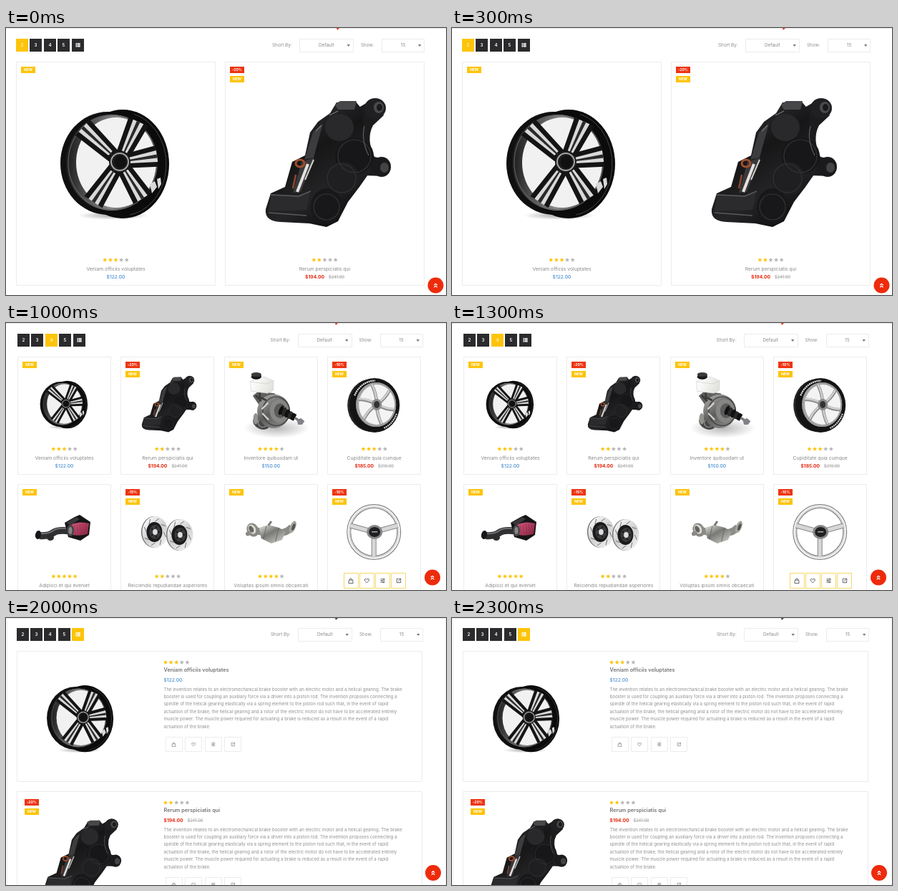
These frames come from a looping animation (615x373 px, 2500 ms). An HTML page with a canvas:

```html
<!DOCTYPE html>
<html lang="en">
<head>
<meta charset="utf-8">
<title>Product grid layouts</title>
<style>
html, body { margin: 0; width: 615px; height: 373px; overflow: hidden; background: #fff; }
canvas { display: block; }
</style>
</head>
<body>
<canvas id="stage" width="615" height="373"></canvas>
<script>
const ctx = document.getElementById('stage').getContext('2d');
const TAU = Math.PI * 2;
const YELLOW = '#fdc40a', RED = '#ee3412', DARK = '#2b2b2d', BLUE = '#4a8fd0', LINE = '#ececec';

function rect(x, y, w, h, fill) {
  ctx.fillStyle = fill;
  ctx.fillRect(x, y, w, h);
}
function frame(x, y, w, h, color = LINE) {
  const left = Math.round(x), top = Math.round(y);
  rect(left, top, w, h, '#fff');
  ctx.strokeStyle = color;
  ctx.lineWidth = 1;
  ctx.strokeRect(left + 0.5, top + 0.5, Math.round(w) - 1, Math.round(h) - 1);
}
function oval(x, y, rx, ry, fill, turn = 0) {
  ctx.beginPath();
  ctx.ellipse(x, y, rx, ry, turn, 0, TAU);
  ctx.fillStyle = fill;
  ctx.fill();
}
function ring(x, y, rx, ry, color, width, from = 0, to = TAU) {
  ctx.beginPath();
  ctx.ellipse(x, y, rx, ry, 0, from, to);
  ctx.strokeStyle = color;
  ctx.lineWidth = width;
  ctx.stroke();
}
function shape(d, fill) {
  ctx.fillStyle = fill;
  ctx.fill(new Path2D(d));
}
function stroke(d, color, width, cap = 'butt') {
  ctx.strokeStyle = color;
  ctx.lineWidth = width;
  ctx.lineCap = cap;
  ctx.lineJoin = 'round';
  ctx.stroke(new Path2D(d));
  ctx.lineCap = 'butt';
}
function shade(x0, y0, x1, y1, ...colors) {
  const g = ctx.createLinearGradient(x0, y0, x1, y1);
  colors.forEach((c, i) => g.addColorStop(i / (colors.length - 1), c));
  return g;
}
function shadow(x, y, rx, ry, strength) {
  ctx.save();
  ctx.translate(x, y);
  ctx.scale(rx, ry);
  const g = ctx.createRadialGradient(0, 0, 0, 0, 0, 1);
  g.addColorStop(0, `rgba(0,0,0,${strength})`);
  g.addColorStop(1, 'rgba(0,0,0,0)');
  oval(0, 0, 1, 1, g);
  ctx.restore();
}
function font(size, weight = 400) {
  ctx.font = `${weight} ${size}px Inter, "Open Sans", sans-serif`;
}
function text(str, x, y, size, color, align = 'left', weight = 400) {
  font(size, weight);
  ctx.textAlign = align;
  ctx.textBaseline = 'middle';
  ctx.fillStyle = color;
  ctx.fillText(str, x, y);
}
function widthOf(str, size, weight) {
  font(size, weight);
  return ctx.measureText(str).width;
}

// Each picture is drawn in its own box: left, top and side length.
const pictures = {
  wheel: [22, 55, 263, () => {
    shadow(150, 262, 50, 6, 0.35);
    oval(142, 189, 66, 72, '#101011');
    oval(163, 190, 65, 76, '#0b0b0c');
    oval(148, 188, 64, 67, shade(85, 180, 215, 190, '#1d1d1e', '#8a8a8c', '#3a3a3c'));
    oval(154, 188, 56, 63, '#f1f1f1');
    ring(149, 188, 62, 66, '#5d5d60', 1.2);
    [[107, 139], [185, 131], [211, 179], [191, 238], [122, 243]].forEach(([x, y]) => {
      const dx = x - 159, dy = y - 187, len = Math.hypot(dx, dy);
      const nx = -dy / len, ny = dx / len;
      const spoke = (start, near, far, color) => {
        const sx = 159 + dx * start, sy = 187 + dy * start;
        shape(`M${sx + nx * near} ${sy + ny * near}L${x + nx * far} ${y + ny * far}` +
          `L${x - nx * far} ${y - ny * far}L${sx - nx * near} ${sy - ny * near}Z`, color);
      };
      spoke(0, 9, 15, '#141415');
      spoke(0.25, 4, 8, '#d9d9da');
      spoke(0.2, 1, 2.5, '#2a2a2b');
    });
    oval(159, 187, 15, 15, '#1c1c1d');
    ring(159, 187, 12, 12, '#a5a5a7', 2);
    oval(160, 187, 8, 9, '#111');
    shape('M201 218l7-4 3 8-7 9zM211 211l5-2 1 9-4 7z', '#d8d8d8');
    ring(163, 190, 61, 72, '#444446', 1, -1.3, 1.4);
  }],
  caliper: [314, 55, 263, () => {
    shape('M488 114L512 100 528 122 513 136Q503 155 515 180L532 184 530 207 502 206 474 160Z', '#1c1c1e');
    oval(516, 112, 15, 14, '#202022');
    oval(521, 111, 7, 8, '#4a4a4d');
    oval(522, 111, 4, 5, '#1a1a1a');
    oval(525, 194, 13, 14, '#1a1a1c');
    oval(529, 195, 6, 7, '#434346');
    shape('M425 146L436 131 453 119 462 104 488 102 499 115 500 150 512 178 508 202 494 222 478 243 464 270 448 278 424 273 384 271Q361 270 363 253L370 231 390 222 400 187 418 178Z',
      shade(390, 130, 480, 270, '#2e2e31', '#161617', '#242426', '#0d0d0e'));
    shape('M460 107L467 102H490L487 114H464Z', '#47474a');
    oval(466, 139, 20, 19, '#29292c');
    shape('M429 146L443 133 430 181 417 184Z', '#3c3c3f');
    stroke('M433 144L441 136M452 122L464 116', '#77777a', 1.2);
    shape('M413 187L431 181 412 229 401 230Z', '#39393b');
    stroke('M422 190L407 229', '#e4e2df', 4);
    stroke('M430 184L418 212', '#cfcdc9', 2);
    ring(411, 189, 6, 5, '#a14f2c', 3);
    stroke('M405 205L401 224', '#8e482c', 2.5);
    oval(487, 179, 27, 26, '#171719');
    oval(470, 210, 24, 23, '#1f1f21');
    oval(448, 249, 22, 25, '#18181a');
    [[487, 179, 23], [469, 210, 20], [448, 250, 18]].forEach(([x, y, r]) => ring(x, y, r, r, '#333336', 1.2));
    shape('M370 232L409 234 425 229 420 254 367 256Z', '#2b2b2e');
    stroke('M370 233L409 235 426 228M367 258L420 262', '#59595c', 1.5);
    stroke('M501 137Q496 157 507 178', '#5d5d60', 1.2);
  }],
  booster: [411, 54, 165, () => {
    shadow(505, 186, 66, 20, 0.28);
    shape('M457 121L468 112 501 116 513 137 477 150Z', '#5f5f5e');
    oval(475, 174, 18, 14, '#474748', 0.4);
    oval(463, 167, 5, 11, '#93938f');
    ring(477, 175, 9, 9, '#8b8b89', 2);
    oval(499, 152, 33, 34, shade(475, 120, 520, 185, '#aaa9a6', '#5d5d5d', '#8d8c89'));
    ring(504, 152, 27, 29, '#444', 2);
    oval(510, 151, 19, 23, '#868684');
    oval(512, 151, 12, 15, '#5b5b5a');
    shape('M452 92L480 83 499 91 498 110 487 116 454 112Z', shade(455, 90, 500, 110, '#fff', '#deded9'));
    stroke('M452 92L480 83 499 91 498 110 487 116 454 112ZM452 93L485 97 498 91', '#c6c6c2', 0.8);
    oval(464, 83, 10, 5, '#111');
    shape('M455 78H474V84H455Z', '#242424');
    oval(464, 78, 10, 4, '#3b3b3b');
    stroke('M471 115V124L484 130M463 120L474 132', '#3b3b3b', 4);
    stroke('M511 149L542 165', '#171717', 14);
    for (let i = 0; i < 5; i++) oval(514 + i * 6, 150 + i * 3.2, 4, 10 - i * 0.7, i % 2 ? '#292929' : '#111', 0.4);
    stroke('M541 165L554 173', '#777', 5);
    shape('M545 169L554 166 561 172 556 179 548 179Z', '#808288');
    stroke('M475 148L488 135M476 156L489 169', '#d6d4cf', 3);
  }],
  tyre: [457, 55, 115, () => {
    oval(511, 115, 34, 37, '#252525');
    oval(515, 115, 35, 38, '#141414');
    oval(517, 114, 28, 31, '#a9a9a9');
    oval(518, 114, 25, 28, '#f3f3f3');
    for (let i = 0; i < 6; i++) {
      const a = i * TAU / 6 + 0.25;
      const x = 518 + 26 * Math.cos(a), y = 114 + 29 * Math.sin(a);
      const mx = 518 + 14 * Math.cos(a + 0.25), my = 114 + 15 * Math.sin(a + 0.25);
      stroke(`M518 114Q${mx} ${my} ${x} ${y}`, '#8c8c8c', 4.5);
      stroke(`M518 113Q${mx} ${my - 1} ${x} ${y - 1}`, '#d0d0d0', 2.5);
    }
    ring(517, 114, 27, 30, '#9c9c9c', 2);
    oval(518, 114, 7, 8, '#8a8a8a');
    oval(518, 114, 4, 5, '#333');
    ctx.setLineDash([2, 0.8]);
    ring(516, 115, 31.5, 34.5, '#e7e7e7', 2.3, 3.55, 4.7);
    ring(516, 115, 31.5, 34.5, '#ccc', 2.3, 0.35, 1.2);
    ctx.setLineDash([]);
  }],
  intake: [24, 233, 115, () => {
    stroke('M47 297Q59 298 66 293T91 291', '#303033', 10);
    stroke('M48 294Q59 295 66 290T90 288', '#737377', 2);
    oval(45, 296, 4, 6, '#17171a', 0.2);
    oval(62, 300, 5, 4, '#2c2c2e');
    shape('M82 279L96 271 103 268 118 278 116 296 104 304 87 299Z', '#151517');
    shape('M84 279L98 271 103 274 90 283Z', '#38383b');
    shape('M91 282Q102 276 116 280L114 295Q103 298 93 296Z', shade(94, 279, 112, 298, '#cf5478', '#872643'));
    for (let i = 0; i < 5; i++) stroke(`M${95 + i * 4} ${282 - i * 0.4}L${97 + i * 3.8} ${296 - i * 0.4}`, '#8d2c4b', 0.6);
    oval(90, 290, 5, 8, '#444447');
    oval(90, 290, 2.5, 5, '#87878a');
  }],
  discs: [169, 233, 115, () => {
    [[209, 292], [244, 296]].forEach(([x, y]) => {
      oval(x - 1.5, y, 18, 22, '#777');
      oval(x, y, 18, 22, shade(x - 15, y - 18, x + 15, y + 18, '#fafafa', '#cfcfcf', '#f0f0f0'));
      for (let i = 0; i < 8; i++) {
        const a = i * TAU / 8;
        stroke(`M${x + 12 * Math.cos(a)} ${y + 15 * Math.sin(a)}L${x + 16 * Math.cos(a + 0.35)} ${y + 20 * Math.sin(a + 0.35)}`, '#646464', 0.9);
      }
      oval(x - 1, y, 11, 14, '#1a1a1c');
      oval(x, y, 8, 10, '#3a3a3c');
      for (let i = 0; i < 5; i++) oval(x + 5.3 * Math.cos(i * TAU / 5), y + 7 * Math.sin(i * TAU / 5), 1, 1.2, '#111');
      oval(x, y, 3.3, 4, '#dedede');
    });
  }],
  converter: [313, 233, 115, () => {
    stroke('M345 289L362 293M383 293Q393 293 400 285', '#8b8b88', 10);
    shape('M354 286L367 282 382 286 391 292 386 303 371 308 357 301Z', shade(360, 281, 375, 308, '#d8d8d4', '#797976', '#b7b7b3'));
    stroke('M364 284L360 302M381 287L377 305', '#696966', 1);
    oval(345, 289, 8, 10, '#8b8984', -0.5);
    oval(344, 288, 5, 7, '#dddcd6', -0.5);
    oval(343, 288, 3, 5, '#66645f', -0.5);
    oval(339, 294, 4, 3, '#8b8984', -0.5);
    oval(401, 285, 4, 9, '#a5a39e', 0.4);
    oval(402, 285, 2, 5, '#55534e', 0.4);
    stroke('M367 283L371 277', '#777', 3);
  }],
  steering: [457, 233, 115, () => {
    ring(514, 292, 35, 36, '#777', 6);
    ring(514, 292, 35, 36, '#dedede', 4);
    ring(514, 292, 36, 37, '#f8f8f8', 1.2);
    ring(514, 292, 33, 34, '#a5a5a5', 1);
    ['M514 292L481 283', 'M514 292L547 283', 'M514 292L514 326'].forEach(d => {
      stroke(d, '#888', 7);
      stroke(d, '#d7d7d7', 5);
    });
    oval(515, 292, 11, 10, '#888');
    oval(515, 292, 8, 7, '#202022');
    rect(511, 291, 8, 1.5, '#aaa');
  }],
  airbox: [371.5, 205, 88, () => {
    stroke('M392 264Q407 265 409 254L420 247', '#252529', 8);
    stroke('M394 261Q406 261 407 252', '#67676b', 1.5);
    shape('M389 237L400 232 414 238 414 250 397 249Z', '#2d2d31');
    oval(395, 238, 4, 5, '#65656a');
    shape('M413 238L437 234 441 253 419 259Z', '#38383c');
    shape('M415 239L435 236 438 250 420 255Z', shade(415, 236, 438, 255, '#98989c', '#555559'));
    shape('M407 248L419 259 440 254 438 263 418 269 403 262Z', '#19191c');
  }],
  seats: [488, 205, 88, () => {
    [[502, 224], [531, 222]].forEach(([x, y]) => {
      const leather = shade(x, y, x + 26, y + 52, '#b9683c', '#8b421f', '#b45f31');
      shape(`M${x + 9} ${y}h11l4 9 3 25-5 8h-15l-4-8 2-23z`, leather);
      shape(`M${x + 1} ${y + 37}q12-6 24 0l1 12-9 5h-17z`, leather);
      shape(`M${x + 9} ${y + 12}h10l2 20-6 5-7-4z`, '#a65b33');
      stroke(`M${x + 8} ${y + 12}l-2 22 7 5 9-5-2-22M${x + 2} ${y + 40}q11-4 22 0`, '#6b2f17', 0.8);
      rect(x + 11, y + 4, 7, 2, '#5b2914');
      stroke(`M${x} ${y + 53}h17l9-5`, '#37221b', 1.5);
    });
  }]
};

function picture(name, x, y, side) {
  const [left, top, size, draw] = pictures[name];
  ctx.save();
  ctx.translate(x, y);
  ctx.scale(side / size, side / size);
  ctx.translate(-left, -top);
  draw();
  ctx.restore();
}

const product = (pic, title, stars, price, old, off) => ({ pic, title, stars, price, old, off });
const products = [
  product('wheel', 'Veniam officiis voluptates', 3, '$122.00'),
  product('caliper', 'Rerum perspiciatis qui', 2, '$194.00', '$241.00', '-20%'),
  product('booster', 'Inventore quibusdam ut', 4, '$150.00'),
  product('tyre', 'Cupiditate quia cumque', 3, '$185.00', '$210.00', '-10%'),
  product('intake', 'Adipisci et qui eveniet', 5, '$130.00'),
  product('discs', 'Reiciendis repudiandae asperiores', 2, '$95.00', '$141.00', '-15%'),
  product('converter', 'Voluptas ipsum omnis obcaecati', 4, '$145.00'),
  product('steering', 'Assumenda nemo magni fugiat', 3, '$158.00', '$196.00', '-10%'),
  product('airbox', 'Veniam officiis voluptates', 3, '$122.00'),
  product('seats', 'Impedit accusantium quidem', 2, '$94.00', '$110.00', '-20%')
];

function starRow(x, y, count) {
  for (let i = 0; i < 5; i++) {
    ctx.beginPath();
    for (let k = 0; k < 10; k++) {
      const r = k % 2 ? 1.4 : 3.2, a = k * TAU / 10 - TAU / 4;
      ctx.lineTo(x + i * 7.6 + r * Math.cos(a), y + r * Math.sin(a));
    }
    ctx.fillStyle = i < count ? YELLOW : '#b5b5b8';
    ctx.fill();
  }
}

function badges(x, y, off) {
  const left = Math.round(x);
  (off ? [off, 'NEW'] : ['NEW']).forEach((label, i) => {
    const top = Math.round(y) + i * 13;
    rect(left, top, 20, 9, label === 'NEW' ? YELLOW : RED);
    text(label, left + 10, top + 4.8, 5, '#fff', 'center', 700);
  });
}

function priceWidth(p) {
  return widthOf(p.price, 6.7, p.old ? 700 : 500) + (p.old ? 6 + widthOf(p.old, 5.8) : 0);
}
function priceLine(p, x, y) {
  const weight = p.old ? 700 : 500;
  text(p.price, x, y, 6.7, p.old ? '#e5290f' : BLUE, 'left', weight);
  if (!p.old) return;
  const start = x + widthOf(p.price, 6.7, weight) + 6;
  text(p.old, start, y, 5.8, '#a5a5a5');
  rect(start, y - 0.3, widthOf(p.old, 5.8), 0.7, '#a5a5a5');
}

function wrap(str, size, limit) {
  return str.split(' ').reduce((lines, word) => {
    const last = lines[lines.length - 1];
    const joined = last ? last + ' ' + word : word;
    if (widthOf(joined, size) > limit) lines.push(word);
    else lines[lines.length - 1] = joined;
    return lines;
  }, ['']);
}

const icons = [
  'M-3-1H3L3.4 4H-3.4ZM-1.6-1V-2.5Q0-5 1.6-2.5V-1',
  'M0 3.2L-3.2 0Q-4-2.6-2-3Q-.6-3 0-1.6Q.6-3 2-3Q4-2.6 3.2 0Z',
  'M-3.5-2.5H3.5M-3.5 0H3.5M-3.5 2.5H3.5M1.5-3.6V-1.4M-1.5-1.1V1.1M1 1.4V3.6',
  'M0-3H-3V3H3V0M.5-3H3.2V-.3M3-3L-.8.8'
];
function actions(x, y, w, h, pitch, border, ink, scale) {
  icons.forEach((d, i) => {
    frame(x + i * pitch, y, w, h, border);
    ctx.save();
    ctx.translate(x + i * pitch + w / 2, y + h / 2);
    ctx.scale(scale, scale);
    stroke(d, ink, 0.9);
    ctx.restore();
  });
}

function card(p, x, y, w, hovered) {
  const side = w - 16, base = y + 8 + side, mid = x + w / 2;
  const lines = hovered ? [''] : wrap(p.title, 6.8, w - 14);
  const extra = (lines.length - 1) * 7;
  frame(x, y, w, side + 50 + extra);
  picture(p.pic, x + 8, y + 8, side);
  badges(x + 7, y + 7, p.off);
  if (hovered) return;
  starRow(mid - 15.2, base + 6, p.stars);
  lines.forEach((line, i) => text(line, mid, base + 18.7 + i * 7, 6.8, '#8a8a8a', 'center'));
  priceLine(p, mid - priceWidth(p) / 2, base + 29.8 + extra);
}

function grid(list, columns, x, y, w, pitch, hovered) {
  list.forEach((p, i) => {
    const row = Math.floor(i / columns);
    card(p, x + (i % columns) * pitch, y + row * (w + 47), w, i === hovered);
  });
}

function dropdown(x, y, w, label) {
  frame(x, y, w, 19);
  text(label, x + w / 2, y + 9.5, 6.3, '#888', 'center');
  shape(`M${x + w - 9} ${y + 8}h4.4l-2.2 3z`, '#777');
}

function toolbar(active, x, y, sortX, tip) {
  rect(0, 0, 615, 1, '#e6e6e6');
  shape(`M${tip - 1} 0h4l-3 3z`, active === 4 ? '#444' : RED);
  for (let i = 0; i < 5; i++) {
    const left = Math.round(x + i * 19.4);
    rect(left, y, 17, 18, i === active ? YELLOW : DARK);
    if (i < 4) text(i + 2, left + 8.5, y + 9.4, 6.2, i === active ? '#fff3c4' : '#fff', 'center', 600);
    else for (let k = 0; k < 3; k++) {
      rect(left + 5.5, y + 6 + k * 2, 1.5, 1.5, '#fff');
      rect(left + 7.5, y + 6 + k * 2, 4.2, 1.5, '#fff');
    }
  }
  text('Short By:', sortX, y + 9.5, 6.4, '#8c8c8c');
  dropdown(sortX + 38, y, 75.5, 'Default');
  text('Show:', sortX + 124, y + 9.5, 6.3, '#8c8c8c');
  dropdown(sortX + 153, y, 60, '15');
}

function upButton(x, y) {
  oval(x, y, 11, 11, '#ee2b0c');
  stroke(`M${x - 2.2} ${y - 0.2}l2.2-2 2.2 2m-4.4 3l2.2-2 2.2 2`, '#fff', 1.2);
}

const blurb = [
  'The invention relates to an electromechanical brake booster with an electric motor and a helical gearing. The brake',
  'booster is used for coupling an auxiliary force via a driver into a piston rod. The invention proposes connecting a',
  'spindle of the helical gearing elastically via a spring element to the piston rod such that, in the event of rapid',
  'actuation of the brake, the helical gearing and a rotor of the electric motor do not have to be accelerated entirely',
  'muscle power. The muscle power required for actuating a brake is reduced as a result in the event of a rapid',
  'actuation of the brake.'
];
function listItem(p, y) {
  frame(15, y, 567, 183);
  picture(p.pic, 24, y + 12, 161);
  if (p.off) badges(26, y + 11, p.off);
  starRow(223, y + 16, p.stars);
  text(p.title, 220.5, y + 27.3, 7.3, '#747474', 'left', 600);
  priceLine(p, 220.5, y + 41);
  blurb.forEach((line, i) => text(line, 220.5, y + 53.8 + i * 10.4, 6.15, '#8f8f8f'));
  actions(222.5, y + 120, 24, 21, 27.6, LINE, '#777', 0.72);
}

const scenes = [
  () => {
    toolbar(0, 14, 15, 372, 463);
    grid(products.slice(0, 4), 2, 14, 47, 279, 292);
    upButton(600.5, 359.5);
  },
  () => {
    toolbar(1, 14, 15, 371, 462);
    grid(products.slice(0, 6), 3, 14, 46, 181, 194.5);
    upButton(599, 357.5);
  },
  () => {
    toolbar(2, 16, 15, 369.5, 461);
    grid(products.slice(0, 8), 4, 16, 47, 131, 144.4, 7);
    actions(471.5, 349, 21, 22, 22.3, '#f5d86b', '#444', 0.9);
    upButton(596, 355.5);
  },
  () => {
    toolbar(3, 13.5, 15, 371, 462);
    grid(products, 5, 13, 46, 104, 116.7, 4);
    actions(497.5, 142.5, 16, 16, 17.8, '#f5d86b', '#444', 0.8);
    [null, '-35%', null, '-5%', null].forEach((off, i) => {
      frame(13 + i * 116.7, 354, 104, 138);
      badges(20 + i * 116.7, 361, off);
    });
    upButton(599, 358);
  },
  () => {
    toolbar(4, 14.5, 14, 370, 461);
    rect(1, 0, 1, 373, '#f2f2f2');
    rect(614, 0, 1, 373, '#f2f2f2');
    listItem(products[0], 46);
    listItem(products[1], 242);
    upButton(597, 356);
  }
];

function render() {
  rect(0, 0, 615, 373, '#fff');
  scenes[Math.floor(performance.now() % 2500 / 500)]();
  requestAnimationFrame(render);
}
render();
</script>
</body>
</html>
```
